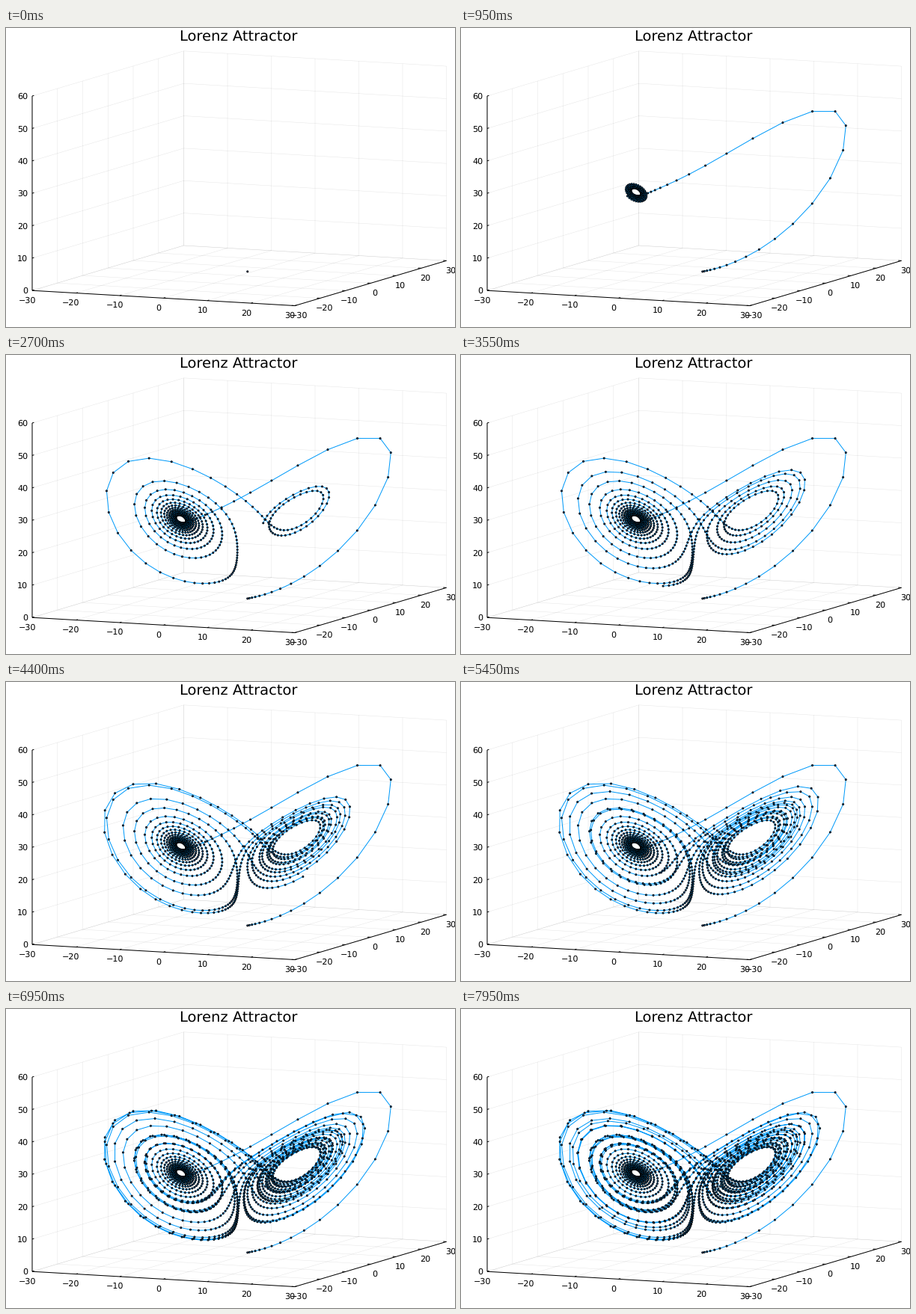
A matplotlib script for the animation above (8000 ms loop, 600 by 400 pixels).

```python
import numpy as np
import matplotlib.pyplot as plt
from matplotlib.animation import FuncAnimation
from matplotlib.collections import LineCollection

W, H, DPI = 600, 400, 100
FRAMES, INTERVAL, STEPS = 160, 50, 10
PX = 72 / DPI  # one pixel in points
BLUE = "#009AFA"

plt.rcParams.update({"font.family": "DejaVu Sans", "text.hinting": "none"})


def project(x, y, z):
    """Map data coordinates to stage pixels (y down)."""
    u, v, w = (x + 30) / 60, (y + 30) / 60, z / 60
    return 35 + 351 * u + 202.5 * v, 351.2 + 20.3 * u - 60.2 * v - 260.2 * w


def lorenz(count, dt=0.02, sigma=10, rho=28, beta=8 / 3):
    """Euler steps in which each coordinate uses those already updated."""
    x = y = z = 1.0
    points = []
    for _ in range(count):
        x += dt * (sigma * (y - x))
        y += dt * (x * (rho - z) - y)
        z += dt * (x * y - beta * z)
        points.append(project(x, y, z))
    return np.array(points)


fig = plt.figure(figsize=(W / DPI, H / DPI), dpi=DPI, facecolor="white")
ax = fig.add_axes([0, 0, 1, 1])
ax.set_xlim(0, W)
ax.set_ylim(H, 0)
ax.axis("off")


def segments(paths, width, **style):
    lines = [[project(*p) for p in path] for path in paths]
    ax.add_collection(LineCollection(lines, linewidths=width * PX, snap=False, **style))


def label(text, x, baseline, size=8, ha="center"):
    ax.text(x, baseline, text, fontsize=size, ha=ha, va="baseline", color="black")


flat = range(-30, 31, 10)
tall = range(0, 61, 10)
tick = 0.72

grid = []
for t in flat:
    grid.append([(t, -30, 0), (t, 30, 0)])
    grid.append([(t, 30, 0), (t, 30, 60)])
    grid.append([(-30, t, 0), (30, t, 0)])
    grid.append([(-30, t, 0), (-30, t, 60)])
for t in tall:
    grid.append([(-30, -30, t), (-30, 30, t)])
    grid.append([(-30, 30, t), (30, 30, t)])
segments(grid, 0.5, colors="black", alpha=0.1, zorder=1)

axes = [
    [(-30, -30, 0), (30, -30, 0)],
    [(30, -30, 0), (30, 30, 0)],
    [(-30, -30, 0), (-30, -30, 60)],
]
for t in flat:
    axes.append([(t, -30, 0), (t, -30 + tick, 0)])
    axes.append([(30, t, 0), (30 - tick, t, 0)])
for t in tall:
    axes.append([(-30, -30, t), (-30 + 0, -30 + tick, t)])
segments(axes, 1, colors="black", zorder=2)

for t in flat:
    name = str(t).replace("-", "\u2212")
    x, y = project(t, -30, 0)
    label(name, x - 6.5, y + 16.3)
    x, y = project(30, t, 0)
    label(name, x + 5.5, y + 16.3)
for t in tall:
    x, y = project(-30, -30, t)
    label(str(t), x - 5.7, y + 4, ha="right")
label("Lorenz Attractor", 310.7, 18, size=14)

track = lorenz((FRAMES - 1) * STEPS + 1)
curve, = ax.plot([], [], color=BLUE, lw=PX, zorder=3)
# Two equal widths keep the dots at sub-pixel positions.
dots = ax.scatter([], [], s=(2 * PX) ** 2, facecolor=BLUE, edgecolor="black",
                  linewidths=[PX, PX], zorder=4)


def draw(i):
    shown = track[:i * STEPS + 1]
    curve.set_data(shown[:, 0], shown[:, 1])
    dots.set_offsets(shown)
    return curve, dots


anim = FuncAnimation(fig, draw, frames=FRAMES, interval=INTERVAL,
                     init_func=lambda: draw(0), repeat=True, repeat_delay=0)
plt.show()
```
